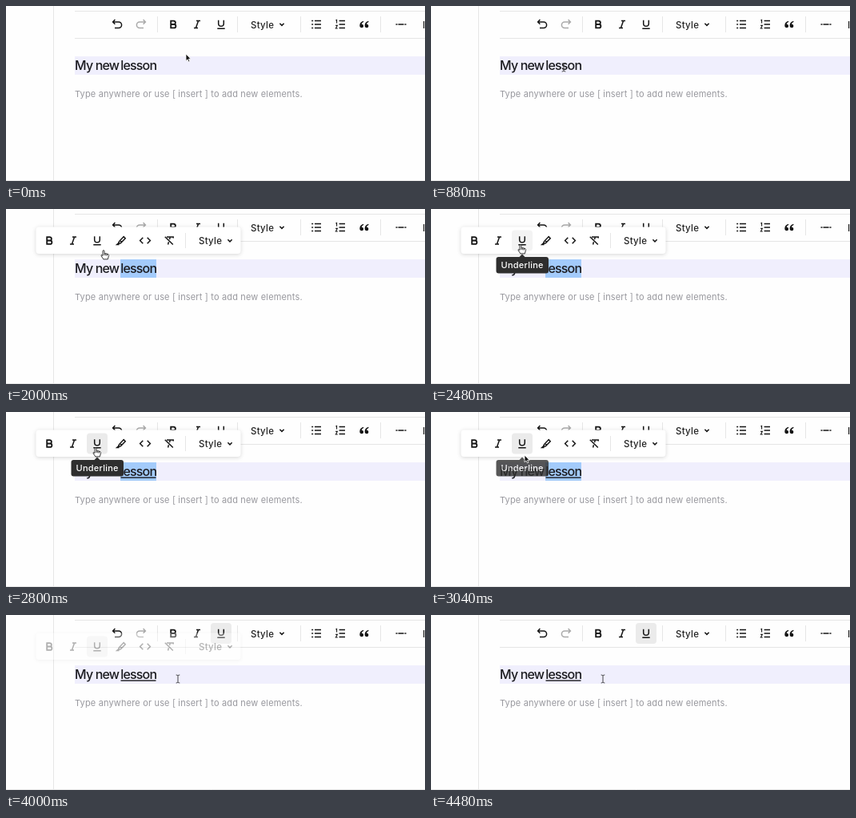
An HTML page that plays this animation: 524x219 px, repeating every 4.56 s.

```html
<!DOCTYPE html>
<html lang="en">
<head>
<meta charset="utf-8">
<title>Underline in a lesson editor</title>
<style>
html, body { margin: 0; width: 100%; height: 100%; overflow: hidden; background: #fefefe; }
svg { display: block; font-family: Inter, "Liberation Sans", sans-serif; }
.icon { fill: none; stroke: #151515; stroke-width: 1.5; }
.rule { stroke: #e6e6e6; }
.style { font-size: 11.5px; font-weight: 500; letter-spacing: .25px; fill: #222; }
.title { font-size: 16px; font-weight: 500; letter-spacing: -.82px; fill: #1b1b1f; }
.hint { font-size: 11px; letter-spacing: .16px; fill: #98989e; }
.tip { font-size: 11px; font-weight: 500; letter-spacing: .25px; fill: #fff; }
#popup { filter: drop-shadow(0 1px 2.5px rgba(0, 0, 0, .16)); }
</style>
</head>
<body>
<svg width="524" height="219" viewBox="0 0 524 219">
  <defs>
    <g id="bold"><path d="M-2.8-4.4H.7a2.2 2.2 0 0 1 0 4.4H-2.8zM-2.8 0H1.2a2.2 2.2 0 0 1 0 4.4H-2.8z" stroke-width="1.8"/></g>
    <g id="italic"><path d="M-1-4.6H4M-4 4.6H1M1.6-4.6L-1.6 4.6"/></g>
    <g id="underline"><path d="M-3.3-5.3V-1a3.3 3.3 0 0 0 6.6 0V-5.3M-4.7 5.2H4.7"/></g>
    <g id="undo"><path d="M-2.6-6L-5.4-3.1L-2.6-.2M-5.2-3.1H1.8a3.8 3.8 0 0 1 0 7.6H-3"/></g>
    <g id="chevron"><path d="M-2.6-1.2L0 1.4L2.6-1.2"/></g>
    <g id="bullets"><path d="M-2-4.4H6M-2 0H6M-2 4.4H6M-5.8-4.4h2M-5.8 0h2M-5.8 4.4h2"/></g>
    <g id="numbers"><path d="M-1.4-4.4H6M-1.4 0H6M-1.4 4.4H6"/><path d="M-5.6-5L-4.4-5.6V-1.4M-5.8 1.4h2.2L-5.6 5H-3.2" stroke-width="1.1"/></g>
    <g id="quote"><path id="mark" d="M-.8-4.3C-4-3.6-5.7-1.5-5.7 1.5C-5.7 3.3-4.6 4.3-3.2 4.3A2.3 2.3 0 0 0-3.2-.3C-3-1.5-2.2-2.4-.8-2.9z" fill="#151515" stroke="none"/><use href="#mark" x="6.3"/></g>
    <g id="divider"><path d="M-6.5 0h2M-3.5 0h7M4.5 0h2"/></g>
    <g id="marker"><path d="M-2.6 1.3L3.2-4.9L5.2-2.8L-.7 3.2L-3.6 3.7zM-1.3-.1L.7 1.9M-3.4 3.4L-5.3 5.1H-2.4"/></g>
    <g id="code"><path d="M-2.7-3.8L-6.4 0L-2.7 3.8M2.7-3.8L6.4 0L2.7 3.8"/></g>
    <g id="clear"><path d="M-3-4.6H5.2V-3M1.4-4.6L.5-1.4M-.6 1.8L-1.4 5M-5.2-4.8L4.8 5"/></g>
    <rect id="pressed" x="-13" y="-13" width="26" height="26" rx="4"/>
  </defs>

  <path class="rule" d="M59.5 0V218M86 6.5H524M86 40.5H524M0 218.5H524"/>
  <use id="barActive" href="#pressed" x="269" y="23" fill="#ebebeb"/>
  <g id="bar" class="icon"></g>
  <path class="rule" d="M189.5 13V33M289.5 13V33M368.5 13V33M468.5 13V33"/>
  <text class="style" x="306" y="27.5">Style</text>
  <text class="style" x="521" y="27.5">Insert</text>

  <rect x="86" y="63" width="438" height="23" fill="#f0effd"/>
  <rect id="selection" x="143" y="63" width="45" height="23" fill="#a3cbfb"/>
  <text class="title" y="80"><tspan x="86">My new</tspan><tspan x="143.2">lesson</tspan></text>
  <rect id="line" x="143.5" y="81.4" width="44" height="1.4" fill="#1b1b1f"/>
  <text class="hint" x="86" y="114">Type anywhere or use [ insert ] to add new elements.</text>

  <g id="popup">
    <rect x="37.5" y="22.5" width="256" height="33.5" rx="4" fill="#fff"/>
    <use id="popupActive" href="#pressed" x="114" y="39.5"/>
    <g id="tools" class="icon"></g>
    <path class="rule" d="M224.5 30V49"/>
    <text class="style" x="241" y="43.8">Style</text>
  </g>
  <g id="tooltip">
    <path d="M114 56.5l4 4h-8z" fill="#2e2e2e"/>
    <rect x="81.5" y="60" width="65.5" height="20.5" rx="3" fill="#2e2e2e"/>
    <text class="tip" x="87.5" y="74.2">Underline</text>
  </g>

  <g id="cursor">
    <path id="arrow" d="M0 0V8.7L2-7L2 6.9L3.4 9.9L4.8 9.3L3.5 6.3H6.1z" fill="#111" stroke="#fff" stroke-width=".8"/>
    <path id="hand" d="M-1 .8Q0-.6 1 .8V4.2L2.6 4.1L4.3 4.6L6 5.2Q6.7 5.6 6.5 7L5.3 11.4H-.2L-2.8 7.3Q-3.3 6-2.2 6L-1 7zM1 4.2V6.6M2.8 4.4V6.8M4.5 4.8V7" fill="#fff" stroke="#222" stroke-width=".9" stroke-linejoin="round"/>
    <path id="beam" d="M-2.3-5Q-.4-5 0-4Q.4-5 2.3-5M0-4V4M-2.3 5Q-.4 5 0 4Q.4 5 2.3 5" fill="none" stroke="#333" stroke-width=".9"/>
  </g>
</svg>
<script>
const $ = id => document.getElementById(id);
const show = (id, opacity) => $(id).setAttribute('opacity', +opacity);

$('arrow').setAttribute('d', 'M0 0V8.7L2 6.9L3.4 9.9L4.8 9.3L3.5 6.3H6.1z');

const fill = (id, y, items) => {
  $(id).innerHTML = items.map(([name, x]) => `<use href="#${name}" x="${x}" y="${y}"/>`).join('');
};
fill('bar', 23, [['undo', 139], ['bold', 209], ['italic', 239], ['underline', 269],
  ['chevron', 345], ['bullets', 388], ['numbers', 418], ['quote', 448], ['divider', 494]]);
$('bar').innerHTML += '<use href="#undo" transform="translate(169 23) scale(-1 1)" stroke="#aaa"/>';
fill('tools', 39.5, [['bold', 54], ['italic', 84], ['underline', 114],
  ['marker', 144], ['code', 174], ['clear', 204], ['chevron', 280]]);

const LOOP = 4560, STEP = 80;
// Pointer hotspot: time, x, y
const path = [[0, 225, 60], [560, 166, 77], [1440, 166, 77], [2000, 122, 51.5], [2320, 112, 44.5],
  [2800, 112, 44.5], [3040, 117, 54], [3280, 185, 96], [3600, 215, 80], [LOOP, 215, 80]];

const ramp = (t, from, to) => Math.min(1, Math.max(0, (t - from) / (to - from)));
const within = (t, from, to) => t >= from && t < to;

function pointer(t) {
  const i = path.findIndex(key => key[0] > t);
  const [t0, x0, y0] = path[i - 1], [t1, x1, y1] = path[i];
  const u = ramp(t, t0, t1), k = u * u * (3 - 2 * u);
  return [x0 + (x1 - x0) * k, y0 + (y1 - y0) * k];
}

function draw(now) {
  const t = Math.floor(now % LOOP / STEP) * STEP;
  const [x, y] = pointer(t);
  const kind = y < 53 ? 'hand' : y < 63 ? 'arrow' : 'beam';
  $('cursor').setAttribute('transform', `translate(${x} ${y})`);
  for (const id of ['hand', 'arrow', 'beam']) show(id, id === kind);

  const clicked = t >= 2640;
  show('selection', within(t, 960, 3920));
  show('popup', ramp(t, 1040, 1280) - ramp(t, 3840, 4080));
  show('tooltip', ramp(t, 2160, 2400) - ramp(t, 2960, 3360));
  show('line', clicked);
  show('barActive', t >= 3200);
  show('popupActive', clicked || within(t, 2160, 2640));
  $('popupActive').setAttribute('fill', clicked ? '#ebebeb' : '#f3f3f3');
  requestAnimationFrame(draw);
}
requestAnimationFrame(draw);
</script>
</body>
</html>
```
